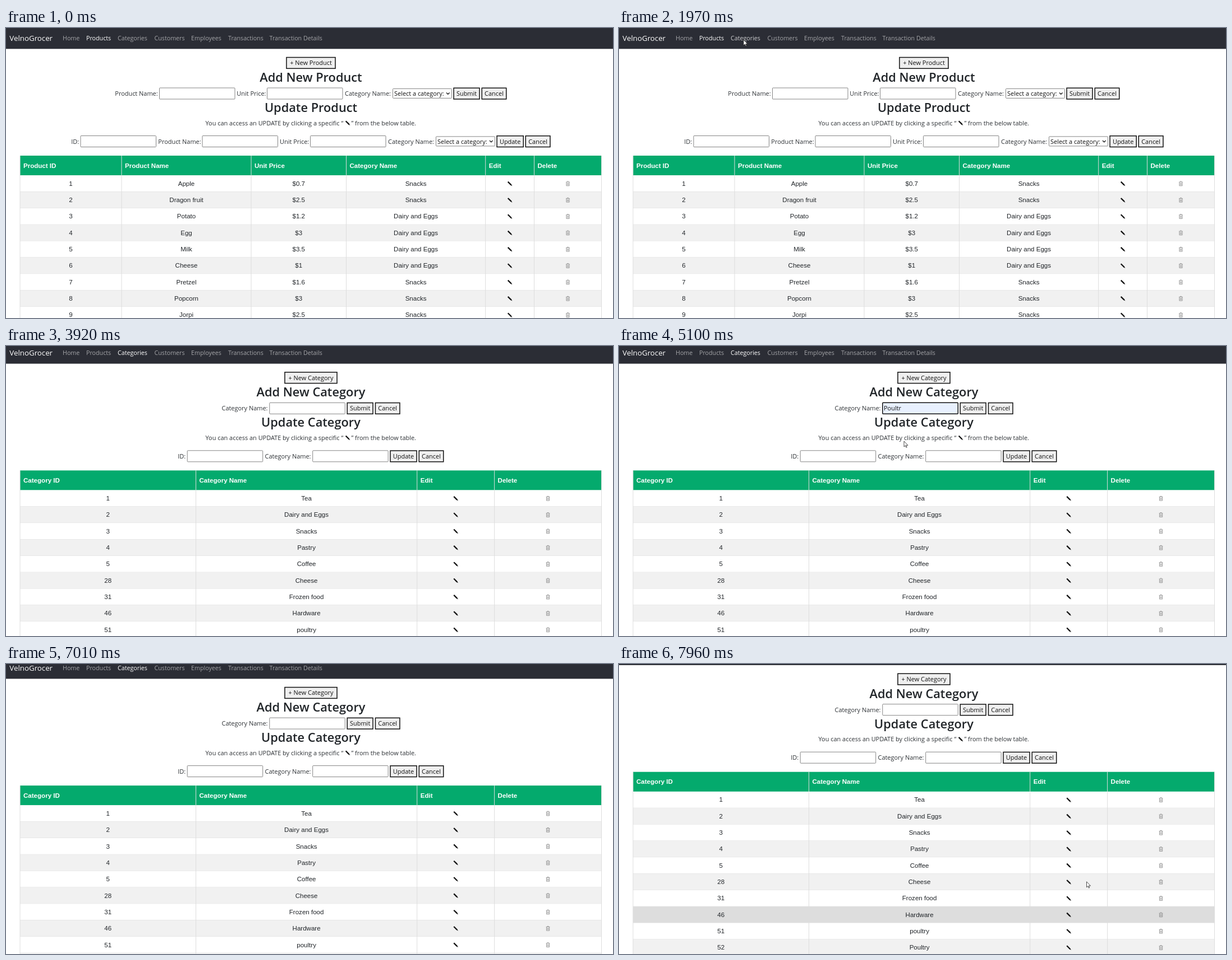
Write an HTML page that moves like this. It is 1082 px wide and 518 px high and loops after 8 s.

```html
<!DOCTYPE html>
<html lang="en">
<head>
<meta charset="utf-8">
<title>Shop admin</title>
<style>
  html, body { margin: 0; width: 100%; height: 100%; overflow: hidden; background: #fff; }
  svg { display: block; width: 100vw; height: 100vh; }
  text { font: 10.95px "Open Sans", "Noto Sans", sans-serif; fill: #2d3135; white-space: pre; }
  .nav { font-size: 10.7px; fill: #fff; }
  .brand { font-size: 13.3px; fill: #fff; }
  .title { font-size: 21.8px; font-weight: 600; fill: #212529; }
  .cell, .head { font: 11.55px "Liberation Sans", Arial, sans-serif; fill: #212529; }
  .head { font-weight: bold; fill: #fff; }
  .dark { fill: #111; }
  .mid { text-anchor: middle; }
  .end { text-anchor: end; }
  .field { fill: #fff; stroke: #858585; }
  .button { fill: #efefef; stroke: #111; stroke-width: 1.5; }
  .line { stroke: #ddd; fill: none; }
</style>
</head>
<body>
<svg viewBox="0 0 1082 518">
  <defs>
    <path id="pencil" d="M-4.2-2.6-2.6-4.2 2.7 1 4.3 4.3 1 2.7Z" fill="#151515"/>
    <g id="bin" fill="none" stroke="#858585" stroke-width=".8">
      <path d="M-2.6-2.5V4H2.6V-2.5M-3.3-2.7H3.3M-1.3-3.8H1.3M-.9-1V2.8M.9-1V2.8"/>
    </g>
  </defs>
  <g id="page"></g>
  <g id="cursor" fill="#fff" stroke="#222" stroke-width=".8" stroke-linejoin="round">
    <path id="arrow" d="M0 0V10L2.3 7.9 3.9 11.3 5.3 10.6 3.8 7.4H7Z"/>
    <path id="hand" d="M0 0C.8 0 1.1.6 1.1 1.4V4.6L5.3 5.7C6.4 6 6.8 6.7 6.6 7.7L5.8 10.4V12.4H.4L-2.9 8.2C-3.6 7-2.2 6.2-1.4 7.1L-1.1 7.4V1.4C-1.1.6-.8 0 0 0Z"/>
  </g>
</svg>
<script>
const LOOP = 8000, TOP = 263.2, ROW = 29.33;
const $ = id => document.getElementById(id);

const text = (x, y, s, cls = '') => `<text x="${x}" y="${y}" class="${cls}">${s}</text>`;
const rect = (x, y, w, h, attrs) => `<rect x="${x}" y="${y}" width="${w}" height="${h}" ${attrs}/>`;
const icon = (id, x, y) => `<use href="#${id}" x="${x}" y="${y}"/>`;
const field = (x, y, id = '') => rect(x + .5, y - 14, 134.5, 20, `class="field" rx="1" ${id && `id="${id}"`}`);
const button = (x, y, w, s) =>
  rect(x + .75, y - 13.8, w - 1.5, 19.8, 'class="button"') + text(x + w / 2, y, s, 'mid dark');
const select = (x, y) => rect(x + .5, y - 12.6, 105, 17, 'class="field" rx="1"') +
  text(x + 3, y, 'Select a category:', 'dark') +
  `<path d="M${x + 96} ${y - 5.5}l2.8 2.8 2.8-2.8" fill="none" stroke="#222" stroke-width="1.4"/>`;

function table(cols, heads, rows) {
  const last = cols.length - 1, bottom = TOP + ROW * rows.length;
  const mid = i => (cols[i] + cols[i + 1]) / 2;
  let out = rect(25, 228, 1036.5, TOP - 228, 'fill="#04aa6d"');
  rows.forEach((row, r) => {
    const y = TOP + r * ROW;
    out += rect(25, y, 1036.5, ROW, 'class="row"');
    row.split('|').forEach((s, i) => out += text(mid(i), y + 18.6, s, 'cell mid'));
    out += icon('pencil', mid(last - 2), y + 14.8) + icon('bin', mid(last - 1), y + 14.6);
    out += `<path class="line" d="M25 ${y + ROW}H1061.5"/>`;
  });
  heads.forEach((s, i) => out += text(cols[i] + 6, 249.6, s, 'head'));
  return out + cols.map(x => `<path class="line" d="M${x} 228V${bottom}"/>`).join('');
}

function frame(kind, half, forms, grid) {
  return button(543.5 - half, 66.3, half * 2, `+ New ${kind}`) +
    text(543.5, 96, `Add New ${kind}`, 'title mid') +
    text(543.5, 150, `Update ${kind}`, 'title mid') +
    text(355.5, 173.6, 'You can access an UPDATE by clicking a specific “') +
    icon('pencil', 609, 169.6) + text(731, 173.6, '” from the below table.', 'end') +
    forms + grid;
}

const A = 121, B = 206.5;
const products = frame('Product', 44.3,
  text(194.3, A, 'Product Name:') + field(273, A) + text(411.3, A, 'Unit Price:') + field(465, A) +
  text(604, A, 'Category Name:') + select(689, A) + button(797.3, A, 47.5, 'Submit') + button(847.5, A, 45, 'Cancel') +
  text(116.3, B, 'ID:') + field(132.5, B) + text(271.3, B, 'Product Name:') + field(349.5, B) +
  text(488, B, 'Unit Price:') + field(542, B) + text(681, B, 'Category Name:') + select(766, B) +
  button(874.3, B, 48.7, 'Update') + button(925.5, B, 45.2, 'Cancel'),
  table([25, 206, 437, 606.5, 854.7, 941.5, 1061.5],
    ['Product ID', 'Product Name', 'Unit Price', 'Category Name', 'Edit', 'Delete'],
    ['1|Apple|$0.7|Snacks', '2|Dragon fruit|$2.5|Snacks', '3|Potato|$1.2|Dairy and Eggs',
     '4|Egg|$3|Dairy and Eggs', '5|Milk|$3.5|Dairy and Eggs', '6|Cheese|$1|Dairy and Eggs',
     '7|Pretzel|$1.6|Snacks', '8|Popcorn|$3|Snacks', '9|Jorpi|$2.5|Snacks']));

const categories = frame('Category', 47.3,
  text(384.5, A, 'Category Name:') + field(469.3, A, 'name') + text(472, A, '', 'dark typed') +
  button(607.5, A, 47.3, 'Submit') + button(657.7, A, 45, 'Cancel') +
  text(306.3, B, 'ID:') + field(322.7, B) + text(461.5, B, 'Category Name:') + field(546.2, B) +
  button(684.3, B, 48.5, 'Update') + button(735.5, B, 45, 'Cancel'),
  table([25, 338.5, 732.7, 870.6, 1061.5], ['Category ID', 'Category Name', 'Edit', 'Delete'],
    ['1|Tea', '2|Dairy and Eggs', '3|Snacks', '4|Pastry', '5|Coffee', '28|Cheese',
     '31|Frozen food', '46|Hardware', '51|poultry', '52|Poultry']));

const links = ['Home', 'Products', 'Categories', 'Customers', 'Employees', 'Transactions', 'Transaction Details'];
const linkX = [101, 143, 199, 264.5, 330, 396, 469.5, 570];

$('page').innerHTML = rect(0, 0, 1082, 37.3, 'fill="#2b2d35"') +
  text(6.3, 22.8, 'VelnoGrocer', 'brand') + links.map((s, i) => text(linkX[i], 22, s, 'nav')).join('') +
  `<g id="products">${products}</g><g id="categories">${categories}</g>`;

const navText = document.querySelectorAll('.nav');
const typed = document.querySelector('.typed');
const rowSets = ['products', 'categories'].map(id => $(id).querySelectorAll('.row'));

// Keys are [time, value, value...]; cursor paths exist only within their own span.
const scrollKeys = [[0, 0], [3280, 0], [3740, 5.7], [6690, 5.7], [6700, 0], [6940, 0], [7170, 35.3], [LOOP, 35.3]];
const paths = [
  [[180, 150, 500], [260, 60, 300], [340, 10, 130], [420, 45, 45], [500, 115, 15], [710, 115, 15],
   [900, 95, 78], [1200, 170, 60], [1510, 225, 24], [1580, 225, 24], [1820, 222, 21], [2080, 222, 21]],
  [[3280, 300, 250], [3740, 535, 112]],
  [[4390, 535, 112], [4610, 508, 170], [5750, 508, 170], [5980, 633.5, 106], [6940, 633.5, 106]],
  [[7240, 1055, 505], [7800, 1003, 440], [7950, 833.5, 388.8], [LOOP, 833.5, 388.8]]
];
const typing = [[5020, 3], [5100, 6], [5430, 7]];

function at(keys, t) {
  const i = Math.max(1, keys.findIndex(k => k[0] >= t));
  const a = keys[i - 1], b = keys[i], p = (t - a[0]) / (b[0] - a[0]);
  return a.slice(1).map((v, n) => v + (b[n + 1] - v) * p);
}
function pointer(t) {
  const path = paths.find(p => t >= p[0][0] && t < p[p.length - 1][0]);
  return path ? at(path, t) : null;
}
function hoverRow(t) {
  const pos = pointer(t);
  if (!pos || pos[0] < 25 || pos[0] > 1061) return -1;
  return Math.floor((pos[1] + at(scrollKeys, t)[0] - TOP) / ROW);
}

function draw(t) {
  const page = t < 2080 ? 0 : 1, pos = pointer(t);
  $('page').setAttribute('transform', `translate(0 ${-at(scrollKeys, t)[0]})`);
  $('products').style.display = page ? 'none' : '';
  $('categories').style.display = page ? '' : 'none';

  const link = pos && pos[1] < 32 ? linkX.findIndex((x, i) => pos[0] >= x - 6 && pos[0] < linkX[i + 1] - 6) : -1;
  navText.forEach((el, i) => el.style.fillOpacity = i === page + 1 ? 1 : i === link ? .77 : .57);

  const hot = hoverRow(t > 7800 ? 7800 : t);
  rowSets[page].forEach((el, i) => el.setAttribute('fill', i === hot ? '#ddd' : i % 2 ? '#f1f1f1' : '#fff'));

  const filled = t >= 4610 && t < 6700, focus = t >= 4070 && t < 6300;
  $('name').style.fill = filled ? '#e8f0fe' : '#fff';
  $('name').style.stroke = focus ? '#111' : '';
  $('name').style.strokeWidth = focus ? 1.5 : 1;
  const count = t < 6700 ? typing.reduce((n, k) => t >= k[0] ? k[1] : n, 0) : 0;
  typed.textContent = 'Poultry'.slice(0, count);

  const hand = link >= 0 && t < 1900 || t > 5950 && t < 7000;
  $('cursor').style.display = pos ? '' : 'none';
  if (pos) $('cursor').setAttribute('transform', `translate(${pos})`);
  $('hand').style.display = hand ? '' : 'none';
  $('arrow').style.display = hand ? 'none' : '';
}

const start = performance.now();
function tick() {
  draw((performance.now() - start) % LOOP);
  requestAnimationFrame(tick);
}
tick();
</script>
</body>
</html>
```
